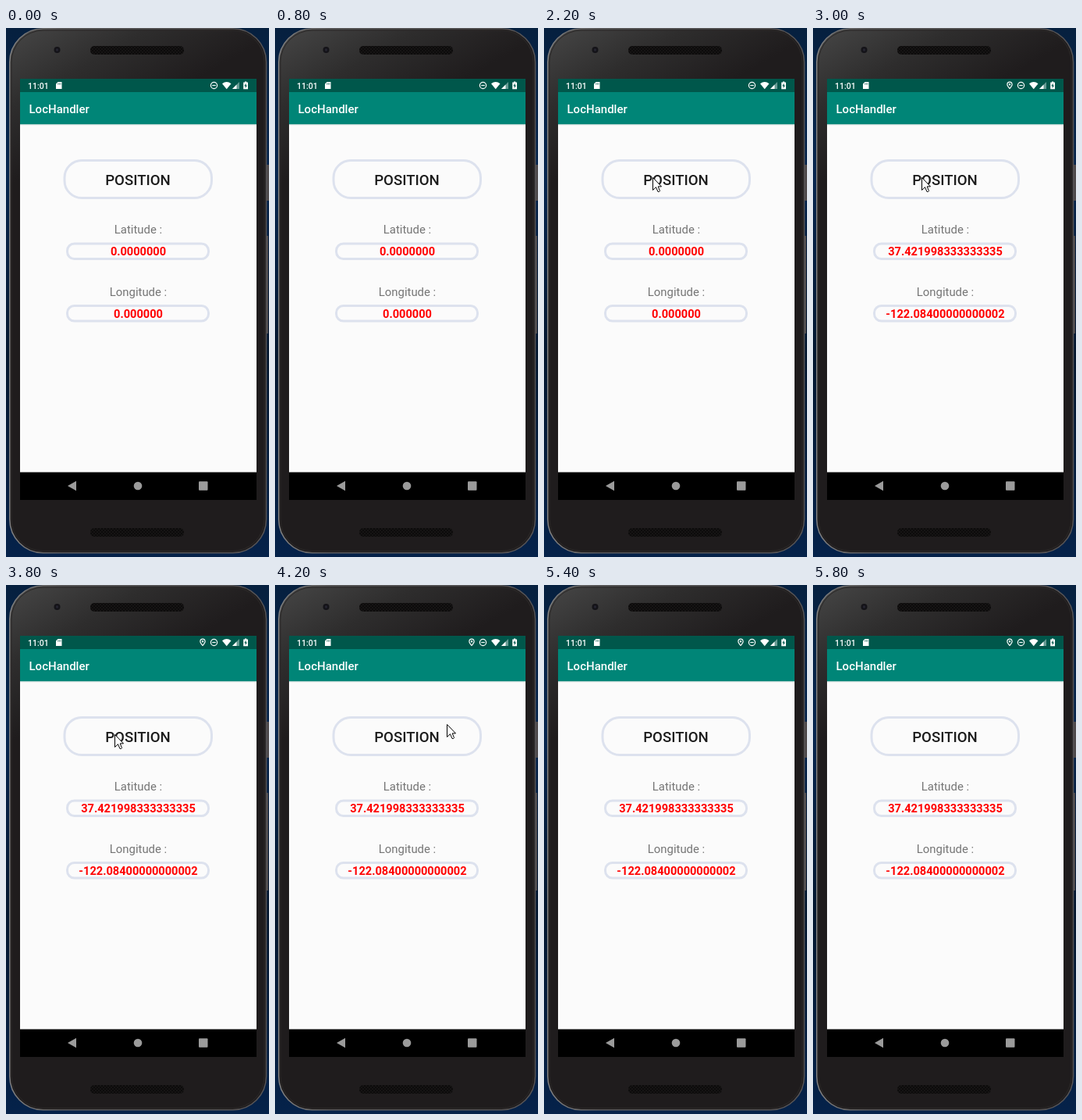
Write an HTML page that moves like this. It is 337 by 677 pixels and loops after 6 s.

```html
<!DOCTYPE html>
<html lang="en">
<head>
<meta charset="utf-8">
<title>Position screen</title>
<style>
  html, body { margin: 0; width: 100%; height: 100%; overflow: hidden; background: #041a38; }
  svg { display: block; width: 100vw; height: 100vh; }
  text { font-family: Roboto, "Noto Sans", sans-serif; }
  .label { font-size: 14.9px; fill: #757575; text-anchor: middle; }
  .value { font-size: 14.6px; font-weight: 700; fill: #f00; text-anchor: middle; }
  .box { fill: #fbfbfb; stroke: #dde2ee; stroke-width: 3; }
</style>
</head>
<body>
<svg viewBox="0 0 337 677">
  <defs>
    <linearGradient id="desk" x2="0" y2="1">
      <stop offset="0" stop-color="#06203f"/>
      <stop offset=".28" stop-color="#07264f"/>
      <stop offset=".62" stop-color="#04172f"/>
      <stop offset="1" stop-color="#05224a"/>
    </linearGradient>
    <linearGradient id="shell" gradientUnits="userSpaceOnUse" x1="10" y1="0" x2="95" y2="150">
      <stop offset="0" stop-color="#464646"/>
      <stop offset=".5" stop-color="#2e2d2d"/>
      <stop offset="1" stop-color="#1f1c1d"/>
    </linearGradient>
    <linearGradient id="rim">
      <stop offset="0" stop-color="#828282"/>
      <stop offset=".2" stop-color="#5c5b5c"/>
      <stop offset="1" stop-color="#565456"/>
    </linearGradient>
    <pattern id="mesh" width="4" height="4" patternUnits="userSpaceOnUse">
      <rect width="4" height="4" fill="#0c0b0b"/>
      <path d="M0 0h2v2h-2zM2 2h2v2h-2z" fill="#161414"/>
    </pattern>
  </defs>
  <rect width="337" height="677" fill="url(#desk)"/>

  <!-- handset -->
  <g fill="#4e4a4c">
    <rect x="334" y="175" width="3" height="46"/>
    <rect x="334" y="266" width="2" height="125"/>
  </g>
  <rect x="4.75" y=".75" width="328.750" height="671" rx="43" fill="url(#shell)" stroke="url(#rim)" stroke-width="1.500"/>
  <rect x="7" y="3" width="324" height="666.500" rx="41" fill="none" stroke="#2c2928"/>
  <circle cx="65.500" cy="28" r="4" fill="#141318"/>
  <circle cx="65.500" cy="28" r="1.700" fill="#252430"/>
  <rect x="108" y="23" width="120" height="11" rx="5" fill="url(#mesh)"/>
  <rect x="108" y="640" width="120" height="11" rx="5" fill="url(#mesh)"/>

  <!-- screen -->
  <rect x="18" y="65" width="303" height="539" fill="#fbfbfb"/>
  <rect x="18" y="65" width="303" height="17.500" fill="#00574b"/>
  <rect x="18" y="82" width="303" height="41.500" fill="#008577"/>
  <rect x="18" y="123.500" width="303" height="1" fill="#e4e6e6"/>
  <rect x="18" y="568.500" width="303" height="35.500" fill="#000"/>

  <!-- status bar -->
  <g fill="#fff">
    <text x="28" y="77.700" font-size="10.500" font-weight="500">11:01</text>
    <path d="M66.500 69H71.500V78H64V71.500Z"/>
    <path d="M66.700 70.500v2M68.300 70.500v2M69.900 70.500v2" stroke="#00574b" stroke-width=".7"/>
    <path id="pin" fill-rule="evenodd" d="M252 78.300C249.500 75.500 248.300 73.800 248.300 72.200A3.700 3.700 0 0 1 255.700 72.200C255.700 73.800 254.500 75.500 252 78.300ZM252 69.700A2.500 2.500 0 0 0 249.500 72.200C249.500 73.300 250.300 74.500 252 76.500C253.700 74.500 254.500 73.300 254.500 72.200A2.500 2.500 0 0 0 252 69.700ZM252 71a1.200 1.200 0 1 1 0 2.400a1.200 1.200 0 1 1 0-2.400Z"/>
    <circle cx="266.500" cy="73.500" r="4.100" fill="none" stroke="#fff" stroke-width="1.200"/>
    <path d="M264.200 72.900h4.600v1.200h-4.600z"/>
    <path d="M277 71.200Q282.700 66.800 288.500 71.200L282.700 78.200Z"/>
    <path d="M299 69V78H290Z" opacity=".4"/>
    <path d="M295.500 72.500V78H290Z"/>
    <path d="M306 68.500h2.200v1h1.800v8.700h-5.800v-8.700h1.800z"/>
    <path d="M307.600 70.800L305.300 74.300H306.700V77L309 73.400H307.600Z" fill="#00574b"/>
  </g>
  <text x="29.500" y="109" font-size="15" font-weight="500" fill="#fff">LocHandler</text>

  <!-- content -->
  <rect class="box" x="75" y="169.500" width="188.500" height="48" rx="22"/>
  <text x="169" y="201" font-size="18.600" font-weight="500" fill="#1c1c1c" text-anchor="middle">POSITION</text>
  <text class="label" x="169.500" y="263">Latitude :</text>
  <rect class="box" x="78.500" y="276" width="181" height="19.500" rx="9"/>
  <text class="value" id="latitude" x="169.500" y="291"></text>
  <text class="label" x="169.500" y="343">Longitude :</text>
  <rect class="box" x="78.500" y="355.500" width="181" height="19.500" rx="9"/>
  <text class="value" id="longitude" x="169.500" y="371"></text>

  <!-- navigation bar -->
  <g fill="#9b9b9b">
    <path d="M79 586L90 579.800V592.200Z"/>
    <circle cx="169" cy="586" r="5.300"/>
    <rect x="247" y="580.300" width="11.500" height="11.500" rx="1"/>
  </g>

  <path id="cursor" d="M.5 .5V16.500L4.500 12.700L7 18.500H8.700L9.500 17.500L7.200 11.900H11.500Z" fill="#fff" stroke="#000"/>
</svg>
<script>
  const LOOP = 6000, STEP = 200, FIX_AT = 2800;
  const [pin, latitude, longitude, cursor] =
    ["pin", "latitude", "longitude", "cursor"].map(id => document.getElementById(id));

  // time, x, y of the pointer
  const path = [
    [1200, 325, 140], [1400, 288, 159], [2000, 139, 191],
    [4000, 139, 191], [4400, 300, 165]
  ];

  const ease = p => p * p * (3 - 2 * p);

  function pointerAt(t) {
    const i = path.findIndex(key => key[0] >= t);
    if (i < 0 || t < path[0][0]) return null;
    const b = path[i], a = path[Math.max(0, i - 1)];
    const p = b === a ? 1 : ease((t - a[0]) / (b[0] - a[0]));
    return [1, 2].map(k => Math.round(a[k] + (b[k] - a[k]) * p));
  }

  function draw(time) {
    const t = Math.floor(time % LOOP / STEP) * STEP;
    const located = t >= FIX_AT;
    pin.style.display = located ? "" : "none";
    latitude.textContent = located ? "37.421998333333335" : "0.0000000";
    longitude.textContent = located ? "-122.08400000000002" : "0.000000";

    const point = pointerAt(t);
    cursor.style.display = point ? "" : "none";
    if (point) cursor.setAttribute("transform", `translate(${point})`);
  }

  const start = performance.now();
  function tick() {
    draw(performance.now() - start);
    requestAnimationFrame(tick);
  }
  tick();
</script>
</body>
</html>
```
